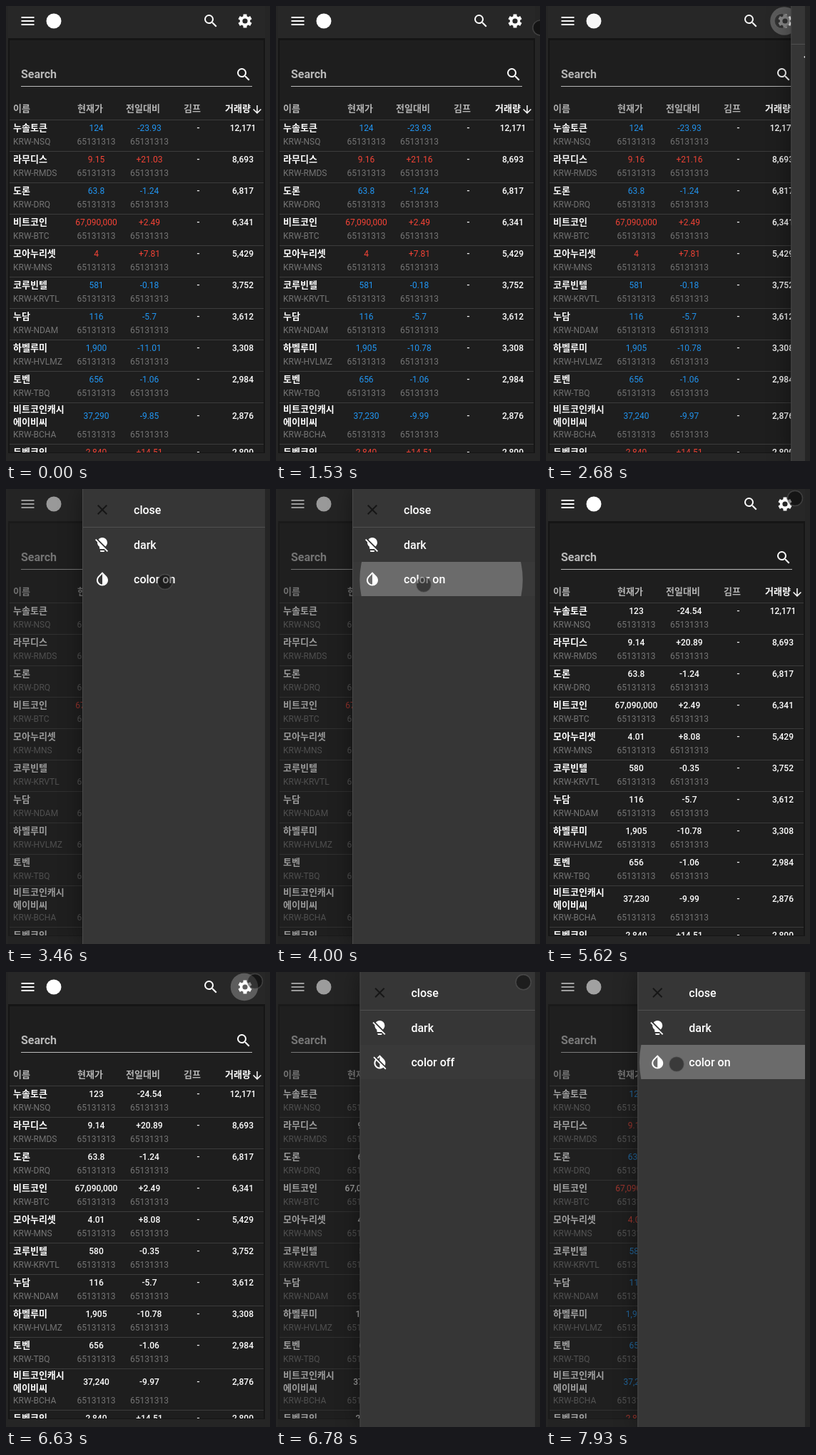
Animation of 370 by 637 pixels, one loop 8 s. Source, as an HTML page with a canvas:

```html
<!DOCTYPE html>
<html lang="ko">
<head>
<meta charset="utf-8">
<style>
html, body { margin: 0; width: 100%; height: 100%; overflow: hidden; background: #252525; }
canvas { display: block; width: 370px; height: 637px; }
</style>
</head>
<body>
<canvas id="stage" lang="ko"></canvas>
<script>
const W = 370, H = 637, LOOP = 8000, LEFT = 3, RIGHT = 363, DRAWER = 256;
const canvas = document.getElementById('stage');
const dpr = window.devicePixelRatio || 1;
canvas.width = W * dpr;
canvas.height = H * dpr;
const c = canvas.getContext('2d');

const LATIN = 'Roboto, sans-serif';
const HANGUL = '"Noto Sans CJK KR", "Noto Sans CJK JP", "Noto Sans CJK", sans-serif';
const RED = '#f44336', BLUE = '#2196f3', GREY = '#757575';

const ICONS = {
  search: 'M15.5 14h-.79l-.28-.27A6.47 6.47 0 0 0 16 9.5 6.5 6.5 0 1 0 9.5 16c1.61 0 3.09-.59 4.23-1.57l.27.28v.79l5 4.99L20.49 19l-4.99-5zm-6 0a4.5 4.5 0 1 1 0-9 4.5 4.5 0 0 1 0 9z',
  menu: 'M3 6h18v2H3zM3 11h18v2H3zM3 16h18v2H3z',
  down: 'M11 4h2v12l5.5-5.5 1.42 1.42L12 19.84l-7.92-7.92L5.5 10.5 11 16z',
  close: 'M19 6.41L17.59 5 12 10.59 6.41 5 5 6.41 10.59 12 5 17.59 6.41 19 12 13.41 17.59 19 19 17.59 13.41 12z',
  bulbOff: 'M12 2C9.76 2 7.78 3.05 6.5 4.68L16.31 14.5C17.94 13.21 19 11.24 19 9A7 7 0 0 0 12 2M3.28 4L2 5.27 5.04 8.3C5 8.53 5 8.76 5 9c0 2.38 1.19 4.47 3 5.74V17a1 1 0 0 0 1 1h5.73l4 4L20 20.72zM9 20v1a1 1 0 0 0 1 1h4a1 1 0 0 0 1-1v-1z',
  dropOn: 'M12 19.58C10.4 19.58 8.89 18.96 7.76 17.83 6.62 16.69 6 15.19 6 13.58 6 12 6.62 10.47 7.76 9.34L12 5.1M17.66 7.93L12 2.27 6.34 7.93c-3.12 3.12-3.12 8.19 0 11.31a8 8 0 0 0 11.32 0c3.12-3.12 3.12-8.19 0-11.31z',
  dropOff: 'M20.65 20.87L4.27 4.5 3 5.77l2.78 2.78c-2.55 3.14-2.36 7.76.56 10.69C7.9 20.8 9.95 21.58 12 21.58c1.79 0 3.57-.59 5.03-1.78l2.7 2.7L21 21.23zM12 19.59c-1.6 0-3.11-.62-4.24-1.76C6.62 16.69 6 15.19 6 13.59c0-1.32.43-2.57 1.21-3.6L12 14.77zM12 5.1v4.58l7.25 7.26c1.37-2.96.84-6.57-1.6-9.01L12 2.27l-3.7 3.7 1.41 1.41z'
};
for (const name in ICONS) ICONS[name] = new Path2D(ICONS[name]);
ICONS.gear = gearPath();

// name, code, price, change, volume
const ROWS = [
  ['누솔토큰', 'NSQ', '124', '-23.93', '12,171'],
  ['라무디스', 'RMDS', '9.15', '+21.03', '8,693'],
  ['도론', 'DRQ', '63.8', '-1.24', '6,817'],
  ['비트코인', 'BTC', '67,090,000', '+2.49', '6,341'],
  ['모아누리셋', 'MNS', '4', '+7.81', '5,429'],
  ['코루빈텔', 'KRVTL', '581', '-0.18', '3,752'],
  ['누담', 'NDAM', '116', '-5.7', '3,612'],
  ['하벨루미', 'HVLMZ', '1,900', '-11.01', '3,308'],
  ['토벤', 'TBQ', '656', '-1.06', '2,984'],
  ['비트코인캐시 에이비씨', 'BCHA', '37,290', '-9.85', '2,876'],
  ['두벤코인', 'DBQ', '2,840', '+14.51', '2,800']
];

// time, row, price, change
const TICKS = [
  [200, 4, '4.01', '+8.08'], [280, 7, '1,905', '-10.78'],
  [660, 9, '37,240', '-9.97'], [740, 1, '9.16', '+21.16'], [820, 4, '4', '+7.81'],
  [900, 4, '4.01', '+8.08'], [980, 1, '9.15', '+21.03'], [1130, 1, '9.16', '+21.16'],
  [1300, 9, '37,230', '-9.99'], [1530, 4, '4', '+7.81'], [1680, 9, '37,240', '-9.97'],
  [2990, 4, '4.01', '+8.08'], [2990, 5, '580', '-0.35'], [2990, 9, '37,230', '-9.99'],
  [4850, 3, '67,098,000', '+2.50'], [5000, 0, '123', '-24.54'],
  [5160, 3, '67,090,000', '+2.49'], [5310, 1, '9.15', '+21.03'],
  [5540, 1, '9.16', '+21.16'], [5620, 1, '9.14', '+20.89'],
  [6000, 4, '4', '+7.81'], [6080, 4, '4.01', '+8.08'], [6230, 9, '37,240', '-9.97']
];

// time, x, y
const POINTER = [
  [1380, 384, 34], [1760, 350, 25], [2450, 331, 21], [3150, 330, 21], [3460, 223, 130],
  [3540, 209, 133], [3690, 207, 134], [4100, 207, 134], [4310, 232, 151], [4650, 236, 150],
  [5470, 349, 13], [6700, 349, 13], [6780, 347, 14], [7240, 206, 114], [7320, 204, 116],
  [7550, 184, 128], [7800, 183, 129], [8000, 183, 129]
];

const OPENS = [2649, 6631], CLOSES = [4030, 7898];
const GEAR_PRESSES = [2440, 6430];
const ITEM_PRESSES = [[3850, 207, 134], [7750, 183, 129]];

const clamp = v => Math.max(0, Math.min(1, v));
const mix = (a, b, u) => a + (b - a) * u;
const white = alpha => `rgba(255,255,255,${alpha})`;

// cubic-bezier(.4, 0, .2, 1)
function ease(x) {
  if (x <= 0 || x >= 1) return clamp(x);
  let lo = 0, hi = 1;
  for (let i = 0; i < 20; i++) {
    const s = (lo + hi) / 2, r = 1 - s;
    if (1.2 * r * r * s + .6 * r * s * s + s * s * s < x) lo = s; else hi = s;
  }
  return lo * lo * (3 - 2 * lo);
}

function gearPath() {
  const path = new Path2D();
  for (let k = 0; k < 6; k++) {
    for (const [radius, degrees] of [[7.2, -21], [9.9, -14], [9.9, 14], [7.2, 21]]) {
      const a = (k * 60 - 90 + degrees) * Math.PI / 180;
      path.lineTo(12 + radius * Math.cos(a), 12 + radius * Math.sin(a));
    }
  }
  path.closePath();
  path.moveTo(15.6, 12);
  path.arc(12, 12, 3.6, 0, 7);
  return path;
}

function rect(x, y, w, h, color) {
  c.fillStyle = color;
  c.fillRect(x, y, w, h);
}

function disc(x, y, r, color) {
  c.fillStyle = color;
  c.beginPath();
  c.arc(x, y, r, 0, 7);
  c.fill();
}

function text(str, x, y, color, { size = 12, weight = 400, align = 'left', family = LATIN } = {}) {
  c.font = `${weight} ${size}px ${family}`;
  c.textAlign = align;
  c.fillStyle = color;
  c.fillText(str, x, y);
}

function icon(name, x, y, color = '#fff', scale = 1) {
  c.save();
  c.translate(x, y);
  c.scale(scale, scale);
  c.fillStyle = color;
  c.fill(ICONS[name], 'evenodd');
  c.restore();
}

function clipped(x, y, w, h, draw) {
  c.save();
  c.beginPath();
  c.rect(x, y, w, h);
  c.clip();
  draw();
  c.restore();
}

// Growth and opacity of a press ripple
function ripple(age) {
  return {
    grow: 1 - (1 - clamp(age / 300)) ** 3,
    alpha: .25 * clamp(age / 100) * clamp(1 - (age - 300) / 300)
  };
}

function drawBar(t) {
  rect(LEFT, 0, RIGHT - LEFT, 46, '#272727');
  icon('menu', 18.5, 9);
  disc(67, 21, 10.5, '#fff');
  icon('search', 275, 9);
  for (const press of GEAR_PRESSES) {
    const { grow, alpha } = ripple(t - press);
    if (alpha > 0) disc(334, 21, 20 * grow, white(alpha));
  }
  icon('gear', 323, 9);
}

function drawTable(t, colored) {
  rect(3, 45, 360, 581, '#151515');
  rect(5, 48, 356, 577, '#1e1e1e');
  text('Search', 21, 101, '#b8b8b8', { size: 16, weight: 700 });
  rect(21, 112, 324, 1, '#bcbcbc');
  icon('search', 321, 84);

  const head = { size: 13, weight: 700, family: HANGUL };
  [['이름', 10], ['현재가', 100], ['전일대비', 168], ['김프', 249]]
    .forEach(([label, x]) => text(label, x, 148, '#b4b4b4', head));
  text('거래량', 307, 148, '#fff', head);
  icon('down', 343, 136, '#fff', .75);

  const rows = ROWS.map(row => [...row]);
  for (const [time, row, price, change] of TICKS) {
    if (t >= time) rows[row].splice(2, 2, price, change);
  }
  clipped(5, 48, 356, 577, () => rows.forEach((row, i) => drawRow(row, i, colored)));
}

function drawRow([name, code, price, change, volume], i, colored) {
  const top = 159 + 44 * i + (i > 9 ? 14 : 0);
  const lines = name.split(' '), tall = lines.length > 1;
  const base = top + (tall ? 23 : 16), sub = top + (tall ? 49 : 35);
  const bold = { weight: 500, align: 'center' };
  const value = { weight: colored ? 400 : 500, align: 'center' };
  const color = !colored ? '#fff' : change[0] === '+' ? RED : BLUE;

  rect(5, top, 356, 1, '#3c3c3c');
  lines.forEach((line, k) => text(line, 10, base + (tall ? k * 18 - 9 : 0), '#fff',
    { size: 13, weight: 700, family: HANGUL }));
  text('KRW-' + code, 10, sub, GREY);
  text(price, 126.5, base, color, value);
  text(change, 201, base, color, value);
  text('-', 269.5, base, '#fff', bold);
  text(volume, 332, base, '#fff', bold);
  for (const x of [126.5, 201]) text('65131313', x, sub, GREY, { align: 'center' });
}

function drawDrawer(t, open, colored) {
  const x = RIGHT - DRAWER * open;
  const label = { size: 16, weight: 500 };
  rect(LEFT, 0, RIGHT - LEFT, H, `rgba(33,33,33,${.46 * open})`);
  clipped(LEFT, 0, RIGHT - LEFT, H, () => {
    c.shadowColor = 'rgba(0,0,0,.4)';
    c.shadowBlur = 30 * dpr;
    rect(x, 0, DRAWER, H, '#363636');
  });
  clipped(x, 0, RIGHT - x, H, () => {
    if (t > ITEM_PRESSES[0][0]) rect(x, 102, DRAWER, 48, white(.015));
    clipped(x, 102, DRAWER, 48, () => {
      for (const [time, px, py] of ITEM_PRESSES) {
        const { grow, alpha } = ripple(t - time);
        if (alpha > 0) {
          const startX = px - (RIGHT - DRAWER) + x;
          disc(mix(startX, x + DRAWER / 2, grow), mix(py, 126, grow), 130.2 * grow, white(alpha));
        }
      }
    });
    rect(x, 53, DRAWER, 1, '#505050');
    rect(x, 0, 1, H, '#4a4a4a');
    icon('close', x + 16, 17, '#161616');
    icon('bulbOff', x + 16, 66);
    icon(colored ? 'dropOn' : 'dropOff', x + 16, 114);
    text('close', x + 72, 35, '#fff', label);
    text('dark', x + 72, 84, '#fff', label);
    text(colored ? 'color on' : 'color off', x + 72, 132, '#fff', label);
  });
}

function drawPointer(t) {
  const next = POINTER.findIndex(p => p[0] > t);
  if (next < 1) return;
  const [t0, x0, y0] = POINTER[next - 1], [t1, x1, y1] = POINTER[next];
  const u = (t - t0) / (t1 - t0);
  disc(mix(x0, x1, u), mix(y0, y1, u), 10.5, 'rgba(0,0,0,.45)');
  c.strokeStyle = 'rgba(105,105,105,.45)';
  c.lineWidth = 1.5;
  c.stroke();
}

function render(t) {
  const progress = time => ease((t - time) / 200);
  const open = OPENS.reduce((sum, time, i) => sum + progress(time) - progress(CLOSES[i]), 0);
  const colored = t < CLOSES[0] || t >= CLOSES[1];
  c.setTransform(dpr, 0, 0, dpr, 0, 0);
  rect(0, 0, W, H, '#252525');
  drawBar(t);
  drawTable(t, colored);
  if (open > 0) drawDrawer(t, open, colored);
  drawPointer(t);
}

const start = performance.now();
(function loop() {
  render((performance.now() - start) % LOOP);
  requestAnimationFrame(loop);
})();
</script>
</body>
</html>
```
